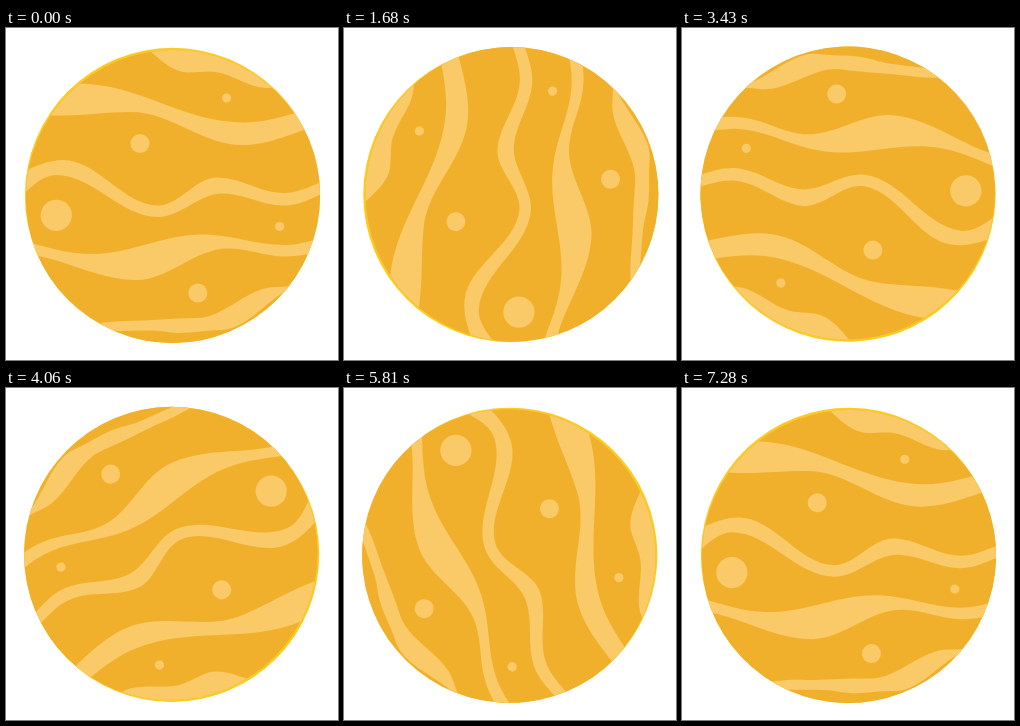
Write an HTML page with a canvas that moves like this. It is 332 by 332 pixels and loops after 7.35 s.

```html
<!DOCTYPE html>
<html lang="en">
<head>
<meta charset="utf-8">
<title>Spinning planet</title>
<style>
html, body { margin: 0; width: 100%; height: 100%; overflow: hidden; background: #fff; }
canvas { display: block; width: 332px; height: 332px; }
</style>
</head>
<body>
<canvas id="stage" width="332" height="332"></canvas>
<script>
const ctx = document.getElementById('stage').getContext('2d');

const LOOP = 7350, STEP = 70;
const HALF = 51.3, FULL = 104.4; // steps at which half and full turns are reached
const PIVOT = { x: 166.2, y: 166.8 };
const BODY = { x: 166.5, y: 167.4, r: 147.6 };
const RIM = { x: 0.9, y: 2.2 };
const COLORS = { rim: '#fccb1f', base: '#f1b02b', light: '#f9ca67' };
const BIG = 15.6, MEDIUM = 9.5, SMALL = 4.6;

// Each edge is a wave given only by its crests and troughs.
const bands = [
  {
    top: [[105, 0], [300, 0]],
    bottom: [[105, 0], [182, 44.5], [203, 43.5], [262, 60], [300, 52]]
  },
  {
    top: [[-10, 80], [72, 55.5], [238, 94.5], [340, 76]],
    bottom: [[-10, 87], [55, 87.5], [125, 84], [236, 117], [345, 92]]
  },
  {
    top: [[-30, 160], [57, 132], [152, 177.5], [211, 149.5], [278, 165], [340, 148]],
    bottom: [[-20, 190], [50, 147], [152, 189], [216, 165.5], [278, 177.5], [345, 158]]
  },
  {
    top: [[-20, 208], [85, 226], [197, 206.5], [278, 217], [350, 203]],
    bottom: [[10, 226], [130, 252], [222, 220.5], [280, 228.5], [360, 215]]
  },
  {
    top: [[70, 297], [120, 293], [190, 290], [270, 259], [320, 254]],
    bottom: [[70, 304], [145, 302.5], [174, 305], [215, 302], [300, 257]]
  }
];

const spots = [
  [50.3, 187.3, BIG],
  [134, 115.5, MEDIUM],
  [191.8, 265, MEDIUM],
  [220.5, 70, SMALL],
  [273.6, 198.5, SMALL]
];

// Joins crests and troughs with level tangents, close to a cosine wave.
function wave(points) {
  let [x0, y0] = points[0];
  ctx.lineTo(x0, y0);
  for (const [x, y] of points.slice(1)) {
    const pull = (x - x0) * 0.364;
    ctx.bezierCurveTo(x0 + pull, y0, x - pull, y, x, y);
    [x0, y0] = [x, y];
  }
}

function disc(x, y, r, color) {
  ctx.beginPath();
  ctx.arc(x, y, r, 0, Math.PI * 2);
  ctx.fillStyle = color;
  ctx.fill();
}

function turn(step) {
  const halves = step < HALF ? step / HALF : 1 + (step - HALF) / (FULL - HALF);
  return -Math.PI * halves;
}

function drawPlanet() {
  const { x, y, r } = BODY;
  disc(x, y, r, COLORS.rim);
  ctx.clip();
  disc(x + RIM.x, y + RIM.y, r, COLORS.base);
  ctx.clip();
  for (const { top, bottom } of bands) {
    ctx.beginPath();
    wave(top);
    wave([...bottom].reverse());
    ctx.closePath();
    ctx.fillStyle = COLORS.light;
    ctx.fill();
  }
  for (const [sx, sy, sr] of spots) disc(sx, sy, sr, COLORS.light);
}

function render() {
  const step = Math.floor((performance.now() % LOOP) / STEP);
  ctx.fillStyle = '#fff';
  ctx.fillRect(0, 0, 332, 332);
  ctx.save();
  ctx.translate(PIVOT.x, PIVOT.y);
  ctx.rotate(turn(step));
  ctx.translate(-PIVOT.x, -PIVOT.y);
  drawPlanet();
  ctx.restore();
  requestAnimationFrame(render);
}

render();
</script>
</body>
</html>
```
